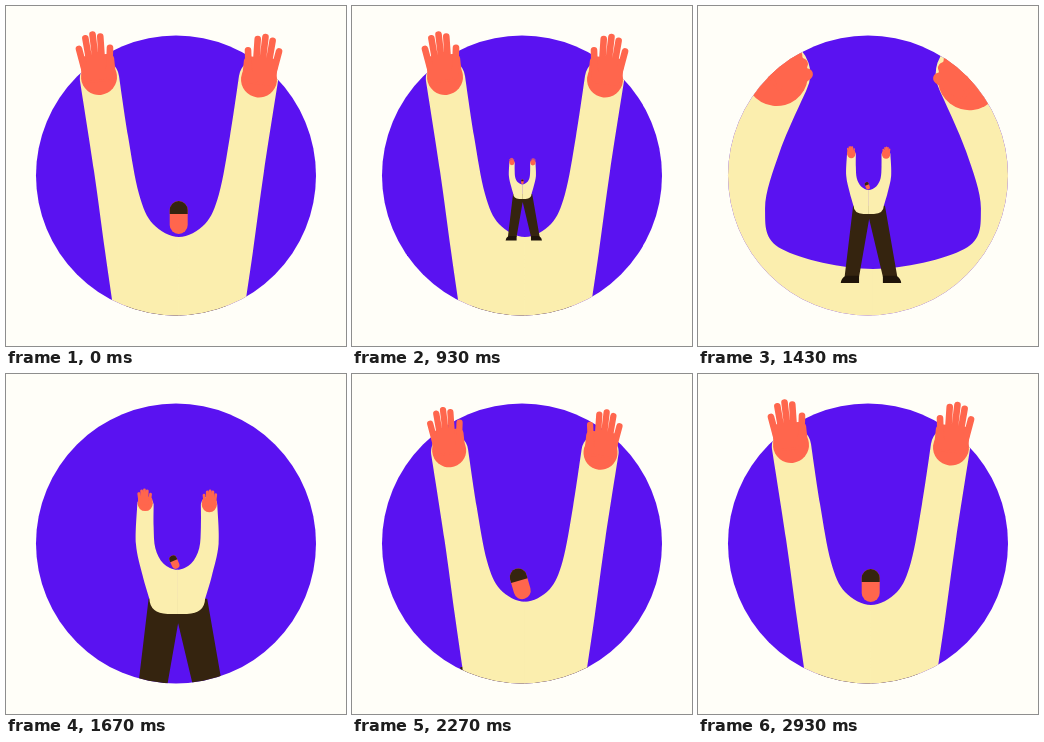
An HTML page for the animation above (2960 ms loop, 340x340 px).

```html
<!DOCTYPE html>
<html lang="en">
<head>
<meta charset="utf-8">
<title>Nested figure</title>
<style>
  html, body { margin: 0; width: 100%; height: 100%; overflow: hidden; background: #fffef8; }
  svg { display: block; width: 100%; height: 100%; }
</style>
</head>
<body>
<svg id="stage" viewBox="0 0 340 340">
  <defs><clipPath id="disc"><circle cx="170" cy="169.5" r="140"/></clipPath></defs>
  <circle cx="170" cy="169.5" r="140" fill="#5a12f1"/>
</svg>
<script>
const LOOP = 2960, RATIO = 7.25, AXIS = 173;
const SKIN = '#ff664d', SHIRT = '#fbeeae', DARK = '#35240f', SHOE = '#1f1409';

// Left half: lower sleeve, elbow, outer cuff, inner cuff, three inner points (x, y pairs),
// then collar height and hand x, y, angle, finger length, size.
const UP    = [99,245, 88,165, 74,75, 113,70, 122,130, 133,188, 147,218, 231, 93,71, -6, 1, 1];
const LOOSE = [91,245, 75,170, 78,78, 117,76, 117,130, 121,180, 140,216, 231, 97,74, 0, .65, 1];
const BENT  = [78,240, 66,190, 95,99, 133,118, 117,155, 108,190, 118,214, 226, 115,109, 52, .12, 1.05];
const CLAP  = [70,265, 45,215, 140,190, 140,226, 128,224, 118,220, 140,227, 229, 155,208, 60, 0, 1];
const TUCK  = [104,280, 105,262, 112,248, 130,238, 138,235, 146,233, 158,232, 232, 144,284, 0, 0, .3];

const OUTER_POSES = [[0, UP], [270, CLAP], [530, BENT], [860, UP], [960, UP], [1250, BENT], [LOOP, BENT]];
const INNER_POSES = [[530, TUCK], [930, LOOSE], [1930, LOOSE], [2270, UP], [LOOP, UP]];
const ZOOM = [[1000, [0]], [1430, [.256]], [1930, [.865]], [2270, [.972]], [2600, [1]]];
const TILT = [[930, [0]], [1430, [-20]], [1930, [-25]], [2270, [-16]], [2620, [0]]];
const RISE = [[270, [0]], [470, [1]]];
const HEAD = [[600, [0]], [900, [1]]];

// Smooth monotone interpolation of vectors between timed keys.
function track(keys, t) {
  const last = keys.length - 1;
  if (t <= keys[0][0]) return keys[0][1];
  if (t >= keys[last][0]) return keys[last][1];
  const i = keys.findIndex(k => k[0] > t) - 1;
  const span = keys[i + 1][0] - keys[i][0], u = (t - keys[i][0]) / span;
  return keys[i][1].map((a, n) => {
    const slope = j => (keys[j + 1][1][n] - keys[j][1][n]) / (keys[j + 1][0] - keys[j][0]);
    const tangent = j => {
      if (j === 0 || j === last) return 0;
      const p = slope(j - 1), q = slope(j);
      return p * q > 0 ? 2 * p * q / (p + q) : 0;
    };
    const b = keys[i + 1][1][n], v = 1 - u;
    return a * (1 + 2 * u) * v * v + b * u * u * (3 - 2 * u)
      + span * (tangent(i) * u * v * v - tangent(i + 1) * u * u * v);
  });
}

function add(parent, tag, attrs = {}) {
  const node = document.createElementNS('http://www.w3.org/2000/svg', tag);
  set(node, attrs);
  return parent.appendChild(node);
}
function set(node, attrs) {
  for (const name in attrs) node.setAttribute(name, attrs[name]);
}

// Curve through points; after is the neighbour beyond the end.
function curve(points, after) {
  const at = i => points[Math.max(0, i)] || after || points[points.length - 1];
  let d = '';
  for (let i = 0; i < points.length - 1; i++) {
    const [a, b, c, e] = [at(i - 1), at(i), at(i + 1), at(i + 2)];
    const h1 = [0, 1].map(k => b[k] + (c[k] - a[k]) / 6);
    const h2 = [0, 1].map(k => c[k] - (e[k] - b[k]) / 6);
    d += `C${h1} ${h2} ${c}`;
  }
  return d;
}

function halfShirt(pose) {
  const p = [];
  for (let i = 0; i < 14; i += 2) p.push([pose[i], pose[i + 1]]);
  const [cuff, inner] = [p[2], p[3]], neck = [AXIS, pose[14]];
  const r = Math.hypot(inner[0] - cuff[0], inner[1] - cuff[1]) / 2;
  return `M${AXIS + .5} 336H150Q108 334 107 300` + curve([[107, 300], p[0], p[1], cuff])
    + `A${r} ${r} 0 0 1 ${inner}`
    + curve([inner, p[4], p[5], p[6], neck], [2 * AXIS - p[6][0], p[6][1]])
    + `H${AXIS + .5}Z`;
}

const FINGERS = [[-17, -30], [-9.5, -40], [-2, -43], [5.5, -40], [14, -28]];
function handPath(reach) {
  return FINGERS.map(([x, y]) => `M${x * .72} 0L${x * (.72 + .28 * reach)} ${-12 + (y + 12) * reach}`).join('');
}

function makeMan(svg) {
  const clipped = add(svg, 'g', { 'clip-path': 'url(#disc)' });
  const body = add(clipped, 'g');
  add(body, 'path', { fill: DARK, d: 'M105 300L68 610H131L175 358L235 610H298L244 300Z' });
  add(body, 'path', { fill: SHOE, d: 'M131 605V637H51Q52 617 72 605ZM235 605V637H315Q314 617 294 605Z' });
  const mirror = `translate(${2 * AXIS} 0) scale(-1 1)`;
  const halves = ['', mirror].map(transform => add(body, 'path', { fill: SHIRT, transform }));

  const frontClip = add(svg, 'g');
  const front = add(frontClip, 'g');
  const head = add(front, 'g');
  add(head, 'rect', { x: -9, y: -33, width: 18, height: 33, rx: 9, fill: SKIN });
  add(head, 'path', { d: 'M-9 -20V-24A9 9 0 0 1 9 -24V-20Z', fill: DARK });
  const hands = ['', mirror + ' translate(0 2.5)'].map(transform => {
    const hand = add(add(front, 'g', { transform }), 'g', { fill: SKIN });
    add(hand, 'circle', { r: 18 });
    const palm = add(hand, 'rect', { x: -17, width: 34, rx: 5 });
    const fingers = add(hand, 'path', { fill: 'none', stroke: SKIN, 'stroke-width': 6.6, 'stroke-linecap': 'round' });
    return { hand, palm, fingers };
  });

  return ({ pose, scale, offset = 0, visible, headSize, tilt, clipHands }) => {
    const transform = `translate(170 ${170 + offset}) scale(${scale}) translate(-170 -170)`;
    for (const node of [body, front]) set(node, { transform });
    for (const node of [clipped, frontClip]) set(node, { display: visible ? 'inline' : 'none' });
    set(frontClip, { 'clip-path': clipHands ? 'url(#disc)' : 'none' });
    for (const half of halves) set(half, { d: halfShirt(pose) });
    set(head, { transform: `translate(172.7 228) rotate(${tilt}) scale(${headSize})` });
    const [x, y, angle, reach, size] = pose.slice(15);
    for (const { hand, palm, fingers } of hands) {
      set(hand, { transform: `translate(${x} ${y}) rotate(${angle}) scale(${size})` });
      set(palm, { y: -22 * reach, height: 22 * reach + 5 });
      set(fingers, { d: handPath(reach) });
    }
  };
}

const stage = document.getElementById('stage');
const drawOuter = makeMan(stage), drawInner = makeMan(stage);

function render(t) {
  const zoom = RATIO ** track(ZOOM, t)[0];
  const rise = track(RISE, t)[0];
  drawOuter({
    pose: track(OUTER_POSES, t), scale: zoom, visible: true,
    headSize: t < 270 ? 1 : 0, tilt: 0, clipHands: t > 1180
  });
  drawInner({
    pose: track(INNER_POSES, t), scale: zoom / RATIO * rise, offset: 64 * (1 - rise),
    visible: t > 270, headSize: track(HEAD, t)[0], tilt: track(TILT, t)[0], clipHands: false
  });
}

let start;
function tick(now) {
  start ??= now;
  render((now - start) % LOOP);
  requestAnimationFrame(tick);
}
render(0);
requestAnimationFrame(tick);
</script>
</body>
</html>
```
